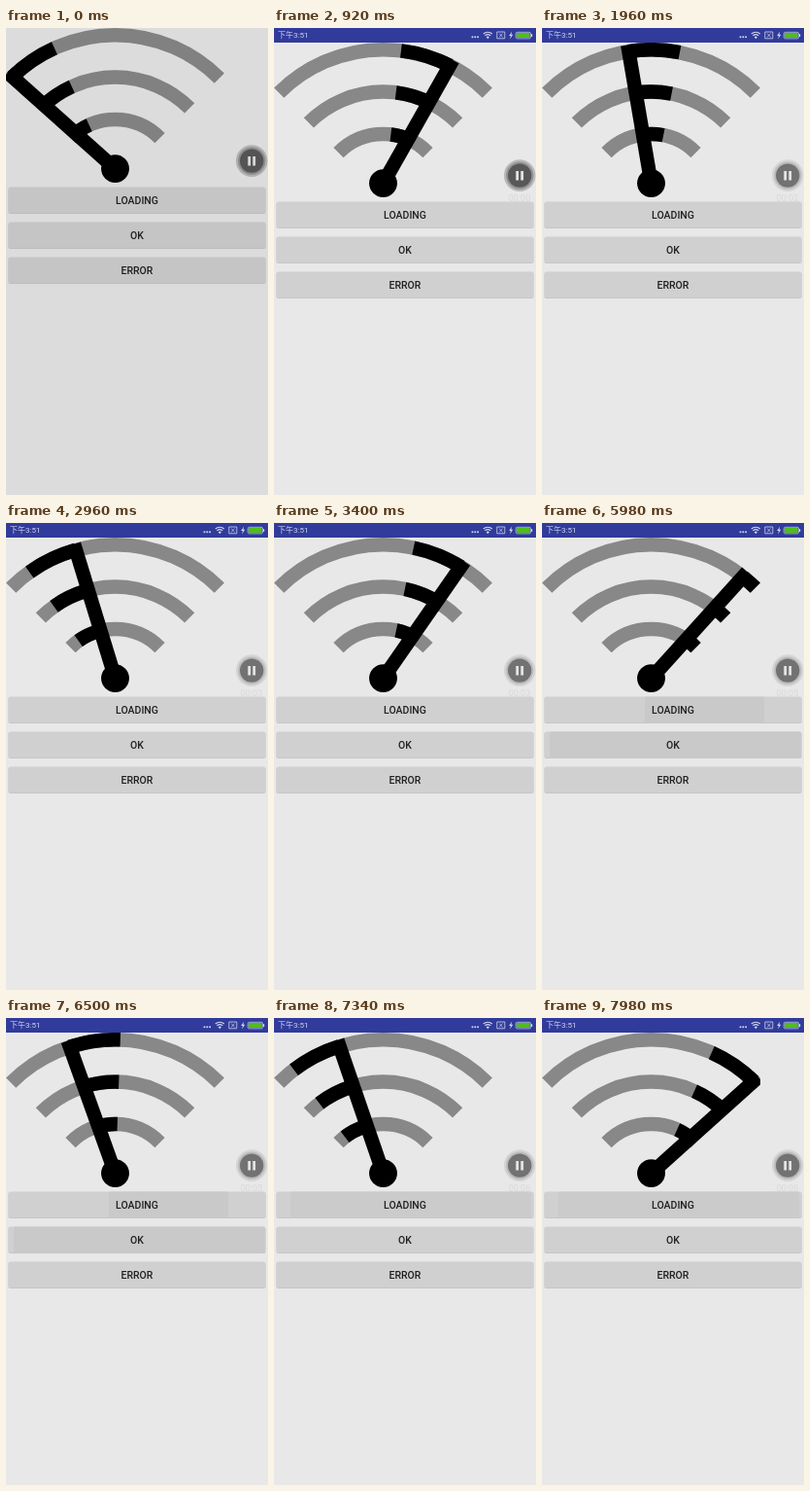
Write an HTML page that moves like this. It is 270 by 480 pixels and loops after 8000 ms.

```html
<!DOCTYPE html>
<html lang="zh">
<head>
<meta charset="utf-8">
<title>Signal loader</title>
<style>
  html, body { margin: 0; width: 100%; height: 100%; overflow: hidden; background: #e8e8e8; }
  svg { display: block; width: 270px; height: 480px; }
  text { font-family: Roboto, "Noto Sans CJK SC", "Noto Sans CJK", sans-serif; }
  .label { font-size: 10.5px; font-weight: 500; fill: #202020; text-anchor: middle; }
  .clock { font-size: 8px; fill: #d3d6ec; }
  .timer { font-size: 9px; fill: #d9d9d9; text-anchor: middle; }
  .arc { fill: none; stroke-width: 14.46; }
</style>
</head>
<body>
<svg viewBox="0 0 270 480">
  <defs>
    <clipPath id="view"><rect y="15" width="225" height="160"/></clipPath>
  </defs>
  <rect width="270" height="480" fill="#e8e8e8"/>

  <g id="app">
    <g clip-path="url(#view)">
      <path id="base" class="arc" stroke="#888"/>
      <path id="lit" class="arc" stroke="#000"/>
      <path id="needle" stroke="#000" stroke-width="14.46"/>
      <circle cx="112.5" cy="159.6" r="14.46"/>
    </g>
    <g id="buttons"></g>
    <text id="timer" class="timer" x="253" y="177.5"></text>
    <circle id="ring" cx="253.2" cy="151.6" r="16.3"/>
    <circle id="rim" cx="253.2" cy="151.6" r="14.2"/>
    <circle id="disc" cx="253.2" cy="151.6" r="12.2"/>
    <path d="M250.7 147v9.4M255.7 147v9.4" stroke="#e4e4e4" stroke-width="2.8"/>
  </g>

  <g id="status">
    <rect width="270" height="15" fill="#303b9b"/>
    <text class="clock" x="4" y="10">下午3:51</text>
    <g fill="#d3d6ec">
      <circle cx="204.5" cy="9.3" r="1"/><circle cx="207.3" cy="9.3" r="1"/><circle cx="210.1" cy="9.3" r="1"/>
      <path d="M220.3 11.2l-1.6-2a2.4 2.4 0 0 1 3.2 0z"/>
      <path d="M245.2 3.5l-3 4.4h1.8l-.9 3.6 3.2-4.7h-1.9z"/>
    </g>
    <g fill="none" stroke="#d3d6ec">
      <path d="M217.4 7.9a4.3 4.3 0 0 1 5.8 0M215.8 6a6.6 6.6 0 0 1 9 0" stroke-width="1.1"/>
      <path d="M229.8 4h8v6.8h-8zM232.2 5.8l3.4 3.4M235.6 5.8l-3.4 3.4" stroke-width=".8"/>
      <rect x="249.2" y="4.3" width="15.4" height="6.6" rx="1.6" stroke-width=".7"/>
    </g>
    <rect x="250" y="5.1" width="13.8" height="5" rx=".8" fill="#50bd1c"/>
    <rect x="265" y="6.2" width="1.2" height="2.8" fill="#d3d6ec"/>
  </g>
  <rect id="dim" width="270" height="480"/>
</svg>

<script>
const LOOP = 8000, UNIT = 14.46, CX = 112.5, CY = 174.06, EDGE = 45, TRAIL = 20;
const OK_AT = 3820, RELOAD_AT = 5980;
const $ = id => document.getElementById(id);
const set = (id, attrs) => { for (const k in attrs) $(id).setAttribute(k, attrs[k]); };

const polar = (r, deg) => {
  const a = deg * Math.PI / 180;
  return (CX + r * Math.sin(a)).toFixed(2) + ' ' + (CY - r * Math.cos(a)).toFixed(2);
};
const arcs = (from, to) => [10.5, 7.5, 4.5].map(n => {
  const r = n * UNIT;
  return `M${polar(r, from)}A${r} ${r} 0 0 1 ${polar(r, to)}`;
}).join('');

$('buttons').innerHTML = ['LOADING', 'OK', 'ERROR'].map((name, i) => {
  const y = 178.5 + i * 36;
  return `<rect x="2.5" y="${y + 0.8}" width="265" height="26.7" rx="1.8" fill="#c3c3c3"/>
    <rect x="2.5" y="${y}" width="265" height="26.7" rx="1.8" fill="#d0d0d0"/>
    <rect id="press${i}" y="${y}" height="26.7" rx="1.5"/>
    <text class="label" x="135" y="${y + 17.4}">${name}</text>`;
}).join('');

function press(i, from, to, fill = '#c9c9c9') {
  set('press' + i, { x: from, width: to - from, fill });
}

function sweep(t) {
  // Each leg crosses the fan once with a cosine ease, then reverses.
  const phase = t < OK_AT ? 2 + (t - 67) / 1212 : 3 + (t - 5788) / 1130;
  const angle = -EDGE * Math.cos(Math.PI * phase);
  const rising = Math.floor(phase) % 2 === 0;
  const from = rising ? Math.max(-EDGE, angle - TRAIL) : angle;
  const to = rising ? angle : Math.min(EDGE, angle + TRAIL);
  set('lit', { d: arcs(from, to) });
  set('needle', { d: `M${CX} ${CY - UNIT}L${polar(10.95 * UNIT, angle)}` });
}

const mix = (a, b, k) => {
  const v = Math.round(a + (b - a) * k);
  return `rgb(${v},${v},${v})`;
};
const ramp = (t, from, to) => Math.min(1, Math.max(0, (t - from) / (to - from)));

function draw(t) {
  const started = t >= 20, ok = t >= OK_AT && t < RELOAD_AT;
  set('app', { transform: `translate(0 ${started ? 0 : -15})` });
  set('status', { visibility: started ? 'visible' : 'hidden' });
  set('dim', { opacity: 0.052 * (1 - ramp(t, 20, 220)) });

  if (ok) set('lit', { d: arcs(-EDGE, EDGE) });
  else sweep(t);
  set('needle', { visibility: ok ? 'hidden' : 'visible' });

  const fade = ramp(t, 1700, 1900);
  set('ring', { fill: mix(186, 213, fade) });
  set('rim', { fill: mix(148, 188, fade) });
  set('disc', { fill: mix(88, 114, fade) });

  const late = t >= 7000;
  if (t < RELOAD_AT) press(0, 0, 0);
  else if (late) press(0, 17, 265, '#cbcbcb');
  else press(0, 106, 229);
  if (t < OK_AT || late) press(1, 0, 0);
  else if (ok) press(1, 127, 227);
  else press(1, 8, 267);
  press(2, 0, 0);

  const ticks = [950, 1950, 2950, RELOAD_AT, RELOAD_AT, 6960];
  const seconds = ticks.filter(at => t >= at).length;
  $('timer').textContent = started ? '00:0' + seconds : '';
}

set('base', { d: arcs(-EDGE, EDGE) });
const start = performance.now();
function frame() {
  draw((performance.now() - start) % LOOP);
  requestAnimationFrame(frame);
}
draw(0);
requestAnimationFrame(frame);
</script>
</body>
</html>
```
